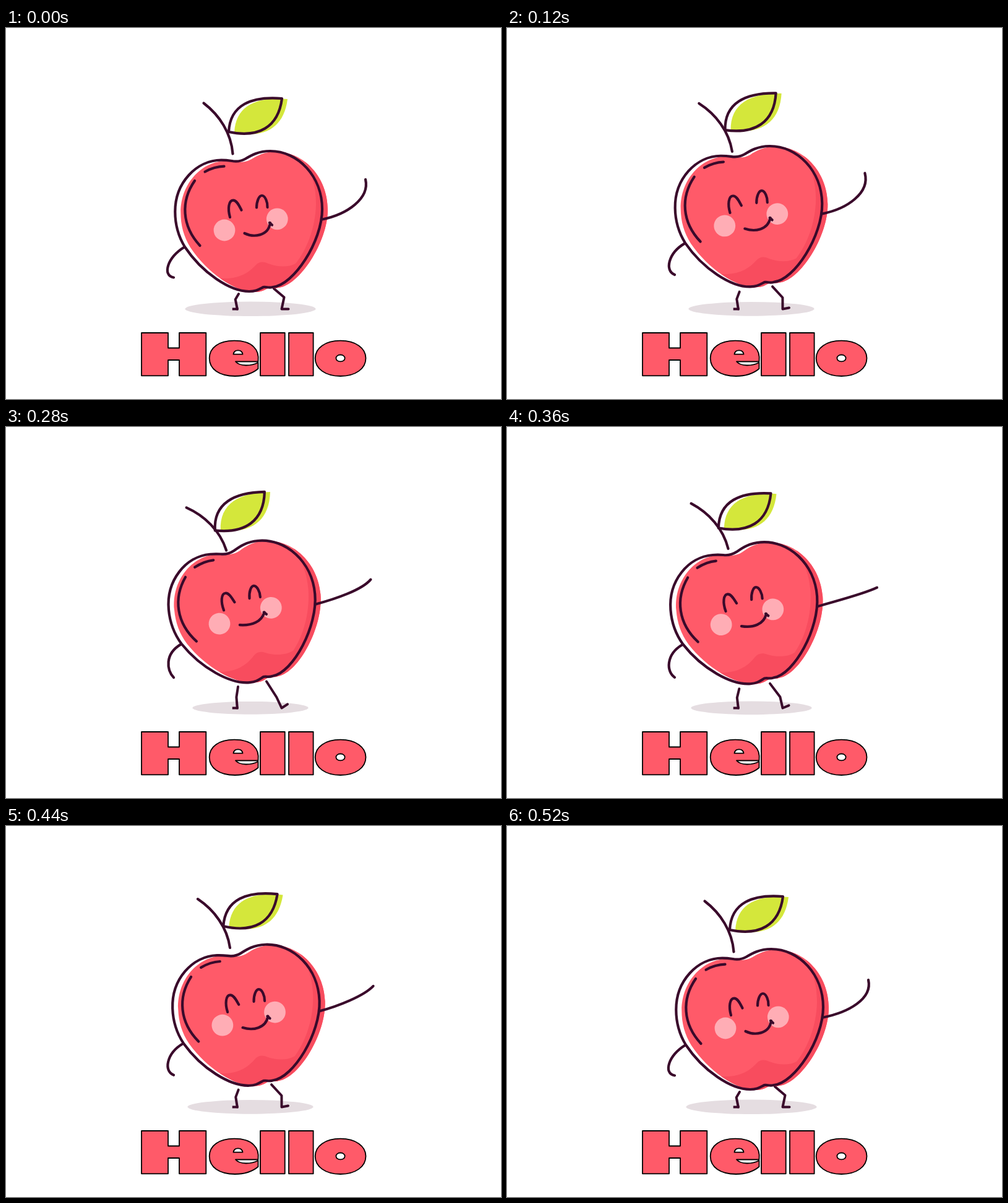
Recreate the animation shown at these times as an HTML page with a canvas. Size 800 px wide and 600 px high, loop 560 ms.

```html
<!DOCTYPE html>
<html lang="en">
<head>
<meta charset="utf-8">
<title>Waving apple</title>
<style>
html, body { margin: 0; width: 100%; height: 100%; overflow: hidden; background: #fff; }
canvas { display: block; width: 800px; height: 600px; }
</style>
</head>
<body>
<canvas id="stage" width="800" height="600" role="img" aria-label="Hello"></canvas>
<script>
const ctx = document.getElementById('stage').getContext('2d');
const INK = '#3a0a2b', RED = '#ff5a69', SHADE = '#f84c5e', BLUSH = '#ffadb5', LEAF = '#d4e73b', SHADOW = '#e5dde1';
const LOOP = 560, STEP = 40, STEPS = 12;
const HIP = [416, 419], STEM_FOOT = [366.5, 203.5], LEAF_FOOT = [360, 168];

const apple = new Path2D('M416 419C421 418 424 421 431 419C465 416 511 345 511 293C511 240 472 199 427 199C408 199 396 206 387 211.5C378 216.5 370 216 365 215C360 214.3 355 213.7 348 213.7C308 213.7 273.3 250 273.3 297C273.3 318 278 336 289 354C317 396 362 426 393 426C404 426 408 423 416 419Z');
const shade = new Path2D('M340 404C375 409 393 395 403 384C409 377.5 416 377 424 381C440 387 457 387 468 381C485 360 500 325 501 285C501 255 494 232 478 208L560 200V450H340Z');
const shine = new Path2D('M305 247C282 280 284 320 313.5 352M321.5 232.5Q337 224 352.5 223.7');
const eyes = new Path2D('M362 306C358 292 360 279 367 278.7C373 278.5 377 288 380.5 294.5M405 290.5C405 280 409 271 413.5 271C419 271 423 282 422.5 290');
const dimple = new Path2D('M426 315L430 318.5');
const stem = new Path2D('M319.5 121.5C345 141 364 170 366.5 203.5');
const leaf = new Path2D('M360 168C362 124 397 110 446 114C440 161 408 178 360 168Z');
const lettering = new Path2D(
  'M219 493H262V517.5H280V493H323.3V562.3H280V537H262V562.3H219Z' +
  'M371 539.5H407.5C410 520 398 505.7 369 505.7C344 505.7 328.7 517 328.7 534C328.7 552 345 563 370 563C386 563 398 559 407.5 551V541C396 547 378 547.5 371 539.5Z' +
  'M367.5 527.7C368 523.5 371 521.3 375 521.3C379 521.3 382 523.5 382.5 527.7Z' +
  'M411 493H450.7V562.3H411ZM457 493H496.6V562.3H457Z' +
  'M540.5 505.7C565 505.7 581.5 517.5 581.5 534C581.5 551 565 563 540.5 563C516 563 499.7 551 499.7 534C499.7 517.5 516 505.7 540.5 505.7Z' +
  'M533.4 534C533.4 530.9 536.4 528.5 540.5 528.5S547.6 530.9 547.6 534S544.6 539.4 540.5 539.4S533.4 537.1 533.4 534Z');

const mix = (a, b, u) => a + (b - a) * u;
const rad = degrees => degrees * Math.PI / 180;
const offset = ([x, y], dx, dy) => [x + dx, y + dy];

function ellipse(x, y, rx, ry, color) {
  ctx.fillStyle = color;
  ctx.beginPath();
  ctx.ellipse(x, y, rx, ry, 0, 0, 7);
  ctx.fill();
}

function line(...points) {
  ctx.beginPath();
  points.forEach(p => ctx.lineTo(...p));
  ctx.stroke();
}

function curve(start, c1, c2, end) {
  ctx.beginPath();
  ctx.moveTo(...start);
  ctx.bezierCurveTo(...c1, ...c2, ...end);
  ctx.stroke();
}

// Paints with the origin point moved to a position and turned there.
function placed(origin, position, angle, paint) {
  ctx.save();
  ctx.translate(...position);
  ctx.rotate(rad(angle));
  ctx.translate(-origin[0], -origin[1]);
  paint();
  ctx.restore();
}

// The colour sits slightly to the right of the ink line.
function fillShifted(path, color, shadePath) {
  ctx.save();
  ctx.translate(9, 1);
  ctx.fillStyle = color;
  ctx.fill(path);
  if (shadePath) {
    ctx.clip(path);
    ctx.translate(-9, -1);
    ctx.fillStyle = SHADE;
    ctx.fill(shadePath);
  }
  ctx.restore();
}

function drawLegs(u) {
  ctx.lineWidth = 4;
  line([mix(376, 375, u), mix(430, 420, u)], [mix(370.7, 372.4, u), mix(439, 437, u)], [373.8, 454.5]);
  line([mix(433, 421, u), mix(421.5, 411.5, u)], [mix(449.5, 437.3, u), mix(435.5, 437, u)],
    [445.5, 454.5], [mix(456.5, 455, u), mix(454.5, 448.3, u)]);
  ctx.lineCap = 'butt';
  line([365.7, 454.5], [375.5, 454.5]);
  ctx.lineCap = 'round';
}

function drawBody(u) {
  fillShifted(apple, RED, shade);
  ellipse(353, 327, 17.4, 17.4, BLUSH);
  ellipse(438.3, 308.8, 17.4, 17.4, BLUSH);
  [apple, shine, eyes, dimple].forEach(path => ctx.stroke(path));
  curve([385.5, 332], [mix(400, 405, u), mix(339, 335, u)], [mix(424, 421, u), mix(337, 330, u)], [427, 315]);
}

function drawRestArm(shoulder, u, wave) {
  const hand = [271, 403.5 + wave(-0.6, -2.2, -2.3)];
  curve(shoulder, offset(shoulder, -27, 16), offset(hand, mix(-19, -11, u), mix(-3, -12, u)), hand);
}

function drawWavingArm(shoulder, step, wave) {
  const hand = [581 + step / 4 + wave(6.9, -9, 0, 1.4), 245 + step / 3 + wave(-0.4, -13.3, 0, 0.9)];
  const stretch = wave(1, -0.65);
  curve(shoulder, offset(shoulder, 40 - 9.7 * stretch, -8),
    offset(hand, 7 - 21 * stretch, 31 - 14 * stretch), hand);
}

function drawStem(wave) {
  const foot = offset(STEM_FOOT, wave(-9.3, 1.1, 1.1), wave(-6.1, 1.65, -2.1));
  placed(STEM_FOOT, foot, wave(-11.6, -0.6, 1.6), () => {
    const onLeaf = paint => placed(LEAF_FOOT, offset(LEAF_FOOT, wave(-4), 0), wave(6.9, -2.5, -0.5), paint);
    onLeaf(() => fillShifted(leaf, LEAF));
    ctx.stroke(stem);
    onLeaf(() => ctx.stroke(leaf));
  });
}

function drawLettering() {
  ctx.fillStyle = RED;
  ctx.fill(lettering, 'evenodd');
  ctx.strokeStyle = '#000';
  ctx.lineWidth = 1.8;
  ctx.stroke(lettering);
}

function draw(step) {
  const phase = Math.PI * step / STEPS;
  // A sum of harmonics that rests at zero at both ends of the loop.
  const wave = (...amps) => amps.reduce((sum, amp, n) => sum + amp * Math.sin((n + 1) * phase), 0);
  const u = 1 - Math.abs(2 * step / STEPS - 1);
  const tilt = wave(4.35, -0.7, -0.8), lift = wave(-14.9, -0.5);
  const cos = Math.cos(rad(tilt)), sin = Math.sin(rad(tilt));
  const onBody = (x, y) => {
    const dx = x - HIP[0], dy = y - HIP[1];
    return offset(HIP, dx * cos + dy * sin, lift + dy * cos - dx * sin);
  };

  ctx.fillStyle = '#fff';
  ctx.fillRect(0, 0, 800, 600);
  ctx.lineCap = ctx.lineJoin = 'round';
  ctx.strokeStyle = INK;

  ellipse(395, 454.3, mix(105.5, 93.5, u), mix(11.8, 10.4, u), SHADOW);
  drawLegs(u);
  ctx.lineWidth = 4.2;
  drawRestArm(onBody(288, 354.5), u, wave);
  placed(HIP, offset(HIP, 0, lift), -tilt, () => drawBody(u));
  drawWavingArm(onBody(511, 309.5), step, wave);
  drawStem(wave);
  drawLettering();
}

const start = performance.now();
function tick() {
  const time = (performance.now() - start) % LOOP;
  // The first pose is held for two steps.
  draw(Math.min(STEPS, Math.max(0, Math.floor(time / STEP) - 1)));
  requestAnimationFrame(tick);
}
tick();
</script>
</body>
</html>
```
